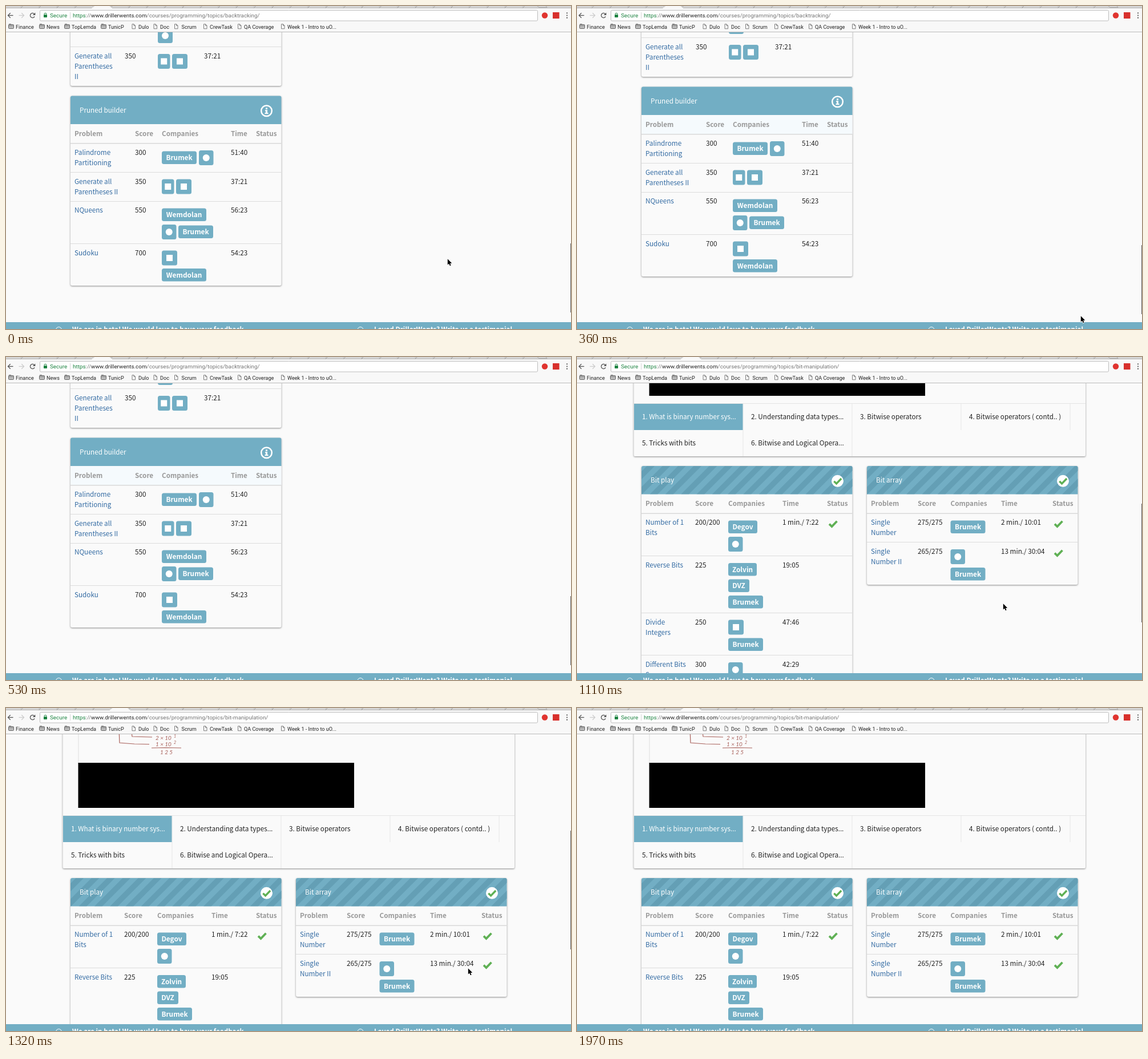
These frames come from a looping animation (990 by 566 pixels, 2.22 s). An HTML page with a canvas:

```html
<!DOCTYPE html>
<html lang="en">
<head>
<meta charset="utf-8">
<title>Course topics</title>
<style>
html, body { margin: 0; width: 100%; height: 100%; overflow: hidden; background: #fafafa; }
canvas { display: block; width: 990px; height: 566px; }
</style>
</head>
<body>
<canvas id="stage" width="990" height="566"></canvas>
<script>
const ctx = document.getElementById('stage').getContext('2d');
const LOOP = 2220;
const BODY = '"Noto Sans CJK JP", "Noto Sans CJK SC", "Noto Sans CJK", "Noto Sans", sans-serif';
const UI = 'Roboto, Inter, sans-serif';
const TEAL = '#72aec4', STRIPE = '#649fb5', LINK = '#336ba3', INK = '#222', PAPER = '#fafafa', GREEN = '#5fb054';
const plain = `11.7px ${BODY}`, bold = `bold 11.7px ${BODY}`, tagFont = `600 11.85px ${BODY}`;

function rect(x, y, w, h, fill) {
  ctx.fillStyle = fill;
  ctx.fillRect(x, y, w, h);
}

function round(x, y, w, h, r, fill, stroke) {
  ctx.beginPath();
  ctx.roundRect(x, y, w, h, r);
  if (fill) { ctx.fillStyle = fill; ctx.fill(); }
  if (stroke) { ctx.strokeStyle = stroke; ctx.lineWidth = 1; ctx.stroke(); }
}

function disc(x, y, r, fill) {
  ctx.beginPath();
  ctx.arc(x, y, r, 0, 7);
  ctx.fillStyle = fill;
  ctx.fill();
}

function ring(x, y, r, color, width) {
  ctx.beginPath();
  ctx.arc(x, y, r, 0, 7);
  ctx.strokeStyle = color;
  ctx.lineWidth = width;
  ctx.stroke();
}

function path(points, color, width) {
  ctx.beginPath();
  for (let i = 0; i < points.length; i += 2) ctx.lineTo(points[i], points[i + 1]);
  ctx.strokeStyle = color;
  ctx.lineWidth = width;
  ctx.stroke();
}

// y is the middle of the capitals
function text(str, x, y, color = INK, font = plain) {
  ctx.font = font;
  ctx.fillStyle = color;
  ctx.fillText(str, x, y + 4.3);
  return x + ctx.measureText(str).width;
}

function check(x, y, size, width) {
  path([x - 6.5 * size, y, x - 2 * size, y + 4.3 * size, x + 7 * size, y - 5 * size], GREEN, width);
}

function panel(x, y, w, h, r) {
  ctx.save();
  ctx.shadowColor = 'rgba(0,0,0,.45)';
  ctx.shadowBlur = 3;
  ctx.shadowOffsetY = 1;
  round(x, y, w, h, r, PAPER);
  ctx.restore();
}

// Company badges: a word, or a plain dot / square for an icon
function badge(x, y, w, label) {
  const icon = label === 'dot' || label === 'box';
  round(x, y, w, icon ? 26 : 22.5, 3.5, TEAL);
  if (label === 'dot') disc(x + w / 2, y + 13, 6, '#fff');
  else if (label === 'box') rect(x + w / 2 - 5.5, y + 7.5, 11, 11, '#fff');
  else {
    ctx.textAlign = 'center';
    text(label, x + w / 2, y + 11.6, '#fff', tagFont);
    ctx.textAlign = 'left';
  }
}

function stripes(x, y, w, h) {
  const step = 27.3;
  ctx.fillStyle = STRIPE;
  for (let right = x + w - step / 2; right > x - h; right -= step) {
    ctx.beginPath();
    ctx.moveTo(right, y + h);
    ctx.lineTo(right - step / 2, y + h);
    ctx.lineTo(right - step / 2 + h, y);
    ctx.lineTo(right + h, y);
    ctx.fill();
  }
}

function drawCard(card) {
  const { x, top, bottom, cols } = card, w = 369.5;
  panel(x, top, w, bottom - top, 3);
  if (card.title) {
    ctx.save();
    round(x, top, w, 49.5, [3, 3, 0, 0], TEAL);
    ctx.clip();
    if (card.solved) stripes(x, top, w, 49.5);
    ctx.restore();
    text(card.title, x + 16, top + 25, '#fff');
    const cx = x + 343.5, cy = top + 26.3;
    if (card.solved) {
      disc(cx, cy, 10.5, '#fff');
      check(cx, cy + 0.5, 0.95, 3.4);
    } else {
      ring(cx, cy, 9.3, '#fff', 2.5);
      rect(cx - 1.5, cy - 5.5, 3, 2.6, '#fff');
      rect(cx - 2.5, cy - 1.5, 4, 1.8, '#fff');
      rect(cx - 1.5, cy - 1.5, 3, 6, '#fff');
      rect(cx - 3, cy + 3.3, 6, 2, '#fff');
    }
    if (card.tint) rect(x, top + 50, w, 33, card.tint);
    ['Problem', 'Score', 'Companies', 'Time', 'Status'].forEach((name, i) =>
      text(name, cols[i], top + 66, '#999', bold));
    rect(x, top + 82.5, w, 1.5, '#d9d9d9');
  }
  for (const y of card.lines) rect(x, y, w, 1, '#dcdcdc');
  for (const [y, name, score, time, done] of card.rows) {
    name.split('|').forEach((part, i) => text(part, cols[0], y + 18 * i, LINK));
    text(score, cols[1], y);
    text(time, cols[3], y);
    if (done) check(cols[4] + 10.5, y + 2.7, 1, 3.8);
  }
  for (const b of card.badges) badge(...b);
}

const upperCard = {
  x: 113, top: -60, bottom: 140, cols: [120, 208, 266, 347, 438], lines: [71],
  rows: [[88, 'Generate all|Parentheses|II', '350', '37:21']],
  badges: [[266, 39, 26, 'dot'], [266, 84, 21.5, 'box'], [291, 84, 27, 'box']]
};
const prunedCard = {
  x: 113, top: 157.5, bottom: 490, title: 'Pruned builder',
  cols: [120, 226, 273, 394, 438], lines: [291, 342, 416],
  rows: [
    [257, 'Palindrome|Partitioning', '300', '51:40'],
    [308, 'Generate all|Parentheses II', '350', '37:21'],
    [358, 'NQueens', '550', '56:23'],
    [433, 'Sudoku', '700', '54:23']
  ],
  badges: [
    [273, 254.5, 61, 'Brumek'], [338, 253, 25.5, 'dot'],
    [273, 303.5, 21.5, 'box'], [298, 303.5, 27, 'box'],
    [273, 354.5, 78, 'Wemdolan'], [273, 383, 25.5, 'dot'], [302, 384.5, 61, 'Brumek'],
    [273, 428.5, 27, 'box'], [273, 460, 78, 'Wemdolan']
  ]
};
const playCard = {
  x: 113, top: 191, bottom: 591, title: 'Bit play', solved: true,
  cols: [120, 207, 265, 360, 438], lines: [348, 448, 522],
  rows: [
    [290, 'Number of 1|Bits', '200/200', '1 min./ 7:22', true],
    [365, 'Reverse Bits', '225', '19:05'],
    [465, 'Divide|Integers', '250', '47:46'],
    [539, 'Different Bits|Sum|Pairwise', '300', '42:29']
  ],
  badges: [
    [265, 286.5, 51, 'Degov'], [265, 315, 25.5, 'dot'],
    [265, 361, 50, 'Zolvin'], [265, 389.5, 37, 'DVZ'], [265, 418, 61, 'Brumek'],
    [265, 460.5, 27, 'box'], [265, 492.5, 61, 'Brumek'], [265, 535, 25.5, 'dot']
  ]
};
const arrayCard = {
  x: 508, top: 191, bottom: 399, title: 'Bit array', solved: true,
  cols: [515, 597, 654.5, 743, 833], lines: [324],
  rows: [
    [290, 'Single|Number', '275/275', '2 min./ 10:01', true],
    [341, 'Single|Number II', '265/275', '13 min./ 30:04', true]
  ],
  badges: [[654.5, 286.5, 61, 'Brumek'], [654.5, 337, 25.5, 'dot'], [654.5, 369, 61, 'Brumek']]
};

function backtrackingPage(scroll) {
  prunedCard.tint = scroll ? '#f5fafd' : null;
  drawCard(upperCard);
  drawCard(prunedCard);
}

function handwriting() {
  const red = '#a8605a', pen = `italic 10px Lato, sans-serif`;
  path([198, -70, 199, -46, 225, -44, 251, -43.5], red, 1.2);
  path([220, -65, 221, -57, 256, -56], red, 1.2);
  text('2 × 10', 262, -55, red, pen);
  text('1 × 10', 262, -44, red, pen);
  text('1', 294, -59, red, `italic 7px Lato, sans-serif`);
  text('2', 294, -48, red, `italic 7px Lato, sans-serif`);
  path([255, -37, 280, -37.5, 307, -37], red, 1.1);
  text('1 2 5', 270, -30, red, pen);
}

function lessonPanel() {
  panel(99.5, -300, 791.5, 474, 2);
  rect(126.5, -200, 1, 190, '#ddd');
  handwriting();
  rect(126.5, -11, 483.5, 79, '#000');
  rect(100, 81, 791, 1, '#e4e4e4');
  for (let i = 1; i < 5; i++) rect(99.5 + 191 * i, 82, 1, i < 3 ? 92 : 46, '#e6e6e6');
  rect(100, 82, 190.5, 46, TEAL);
  ['1. What is binary number sys...', '2. Understanding data types...', '3. Bitwise operators',
    '4. Bitwise operators ( contd.. )', '5. Tricks with bits', '6. Bitwise and Logical Opera...'
  ].forEach((name, i) => text(name, 114 + 191 * (i % 4), i < 4 ? 104.5 : 150.5, i ? INK : '#fff'));
}

function bitsPage() {
  lessonPanel();
  drawCard(playCard);
  drawCard(arrayCard);
  rect(0, 695.5, 990, 60, '#eeeeee');
  [[297, 'About Us'], [385, 'FAQ'], [445, 'Contact Us'], [542, 'Terms'], [614, 'Privacy Policy']]
    .forEach(([x, name]) => text(name, x, 721.5, LINK));
  for (const x of [364, 424, 521, 593]) rect(x, 712, 1, 18, '#444');
}

function feedbackBar() {
  rect(0, 554, 990, 12, TEAL);
  ring(92.5, 567.5, 5, '#fff', 1);
  ring(621, 567.5, 5, '#fff', 1);
  text('We are in beta! We would love to have your feedback.', 116, 567, '#fff', bold);
  text('Loved DrillerWents? Write us a testimonial.', 645, 567, '#fff', bold);
}

function tabStrip(active) {
  rect(0, 0, 990, 4, '#d6d6d6');
  rect(0, 3, 990, 1, '#b4b4b4');
  const step = 31.4;
  for (let i = 0; i < 30; i++) {
    const x = -6 + step * i;
    path([x, 4, x + 4, 0], '#a2a2a2', 1);
    path([x + 4, 4, x, 0], '#c0c0c0', 1);
  }
  const x = -4 + step * active;
  ctx.beginPath();
  ctx.moveTo(x - 3, 4);
  ctx.lineTo(x + 2, 0);
  ctx.lineTo(x + step - 3, 0);
  ctx.lineTo(x + step + 2, 4);
  ctx.fillStyle = '#f8f8f8';
  ctx.fill();
  path([931, 0, 934, 2.5, 948, 2.5, 946, 0], '#aaa', 1);
}

function toolbarIcons() {
  const arrow = (x, dir, color) => {
    path([x - 4.5, 16.5, x + 4.5, 16.5], color, 1.3);
    path([x - dir * 0.3, 12.2, x - dir * 4.5, 16.5, x - dir * 0.3, 20.8], color, 1.3);
  };
  arrow(8, 1, '#555');
  arrow(27, -1, '#ccc');
  ctx.beginPath();
  ctx.arc(46.5, 16.5, 4, 0.5, 5.5);
  ctx.strokeStyle = '#555';
  ctx.lineWidth = 1.4;
  ctx.stroke();
  ctx.beginPath();
  ctx.moveTo(51.3, 11.5);
  ctx.lineTo(51.3, 16);
  ctx.lineTo(46.8, 16);
  ctx.fillStyle = '#555';
  ctx.fill();

  ring(902, 15.5, 3.3, '#555', 1.2);
  path([904.3, 18, 907.5, 21], '#555', 1.5);
  path([900.3, 15.5, 903.7, 15.5], '#555', 1);
  path([902, 13.8, 902, 17.2], '#555', 1);

  ctx.beginPath();
  for (let i = 0; i < 10; i++) {
    const a = -Math.PI / 2 + i * Math.PI / 5, r = i % 2 ? 2.1 : 4.8;
    ctx.lineTo(921.3 + r * Math.cos(a), 16.8 + r * Math.sin(a));
  }
  ctx.closePath();
  ctx.strokeStyle = '#555';
  ctx.lineWidth = 0.9;
  ctx.stroke();
  disc(944, 16.5, 5.2, '#e0342f');
  rect(958, 11, 11.5, 11, '#d8302c');
  for (const y of [12.3, 16.5, 20.7]) disc(983, y, 1.1, '#555');
}

function addressBar(path_) {
  round(59.5, 7.5, 872, 18.5, 2, '#fff', '#bdbdbd');
  const green = '#1d8341', font = `9.9px ${UI}`;
  round(66, 15, 6, 5, 0.8, green);
  ctx.beginPath();
  ctx.arc(69, 14.5, 2, Math.PI, 0);
  ctx.strokeStyle = green;
  ctx.lineWidth = 1.1;
  ctx.stroke();
  text('Secure', 77, 16, green, font);
  rect(112, 11, 1, 11, '#d5d5d5');
  let x = text('https', 117, 16, green, font);
  x = text('://', x, 16, '#777', font);
  x = text('www.drillerwents.com', x, 16, INK, font);
  text(path_, x, 16, '#757575', font);
}

function bookmarks() {
  const font = `9.1px ${UI}`;
  [[4, 'Finance'], [58, 'News'], [102, 'TopLemda'], [166, 'TunicP']].forEach(([x, name]) => {
    round(x + 0.5, 32.5, 9, 7, 1, '#bbb', '#666');
    rect(x + 1, 31.3, 4, 1.5, '#666');
    rect(x + 1, 34, 8, 0.8, '#777');
    text(name, x + 13, 35.2, INK, font);
  });
  [[220, 'Dulo', 12], [258, 'Doc', 12], [294.5, 'Scrum', 13], [345.5, 'CrewTask', 11.5],
    [405.5, 'QA Coverage', 11.5], [481.5, 'Week 1 - Intro to uO...', 11.5]].forEach(([x, name, gap]) => {
    path([x + 4, 31.8, x + 1, 31.8, x + 1, 39.8, x + 6.5, 39.8, x + 6.5, 34.3, x + 4, 31.8, x + 4, 34.3, x + 6.5, 34.3], '#707070', 0.9);
    text(name, x + gap, 35.2, INK, font);
  });
}

function browser(active, route) {
  rect(0, 0, 990, 46, '#f8f8f8');
  tabStrip(active);
  toolbarIcons();
  addressBar('/courses/programming/topics/' + route + '/');
  bookmarks();
  rect(0, 45, 990, 1, '#bcbcbc');
}

function pointer(x, y) {
  ctx.beginPath();
  [[0, 0], [0, 10.3], [2.4, 8.2], [4, 12], [5.8, 11.2], [4.2, 7.6], [7.4, 7.4]]
    .forEach(([dx, dy]) => ctx.lineTo(x + 0.8 + dx, y + 0.3 + dy));
  ctx.closePath();
  ctx.lineJoin = 'round';
  ctx.strokeStyle = '#fff';
  ctx.lineWidth = 1.6;
  ctx.stroke();
  ctx.fillStyle = '#000';
  ctx.fill();
  ctx.lineJoin = 'miter';
}

const pages = {
  back: { draw: backtrackingPage, tab: 5, route: 'backtracking', thumb: 121 },
  bits: { draw: bitsPage, tab: 6, route: 'bit-manipulation', thumb: 208 }
};
// Each step holds until the next one begins
const steps = [
  { at: 0, page: 'back', scroll: 0, mouse: [773, 443], bar: 416 },
  { at: 150, page: 'back', scroll: -16, mouse: [847, 503], bar: 419 },
  { at: 360, page: 'back', scroll: -16, mouse: [882, 543], bar: 419 },
  { at: 530, page: 'back', scroll: -16, bar: 419 },
  { at: 960, page: 'bits', scroll: -180, mouse: [746, 432], bar: 327 },
  { at: 1110, page: 'bits', scroll: 0, mouse: [746, 432], bar: 257 },
  { at: 1320, page: 'bits', scroll: 107, mouse: [809, 456], bar: 215 },
  { at: 1500, page: 'bits', scroll: 107, mouse: [909, 531], bar: 215 },
  { at: 1670, page: 'bits', scroll: 107, mouse: [937, 545], bar: 215 },
  { at: 1820, page: 'bits', scroll: 107, bar: 215, fade: 0.4 },
  { at: 1970, page: 'bits', scroll: 107, fade: 0 }
];

function render(time) {
  const step = steps.findLast(s => s.at <= time), page = pages[step.page];
  rect(0, 0, 990, 566, PAPER);
  ctx.save();
  ctx.translate(0, step.scroll);
  page.draw(step.scroll);
  ctx.restore();
  feedbackBar();
  browser(page.tab, page.route);
  const fade = step.fade ?? 1;
  if (fade) rect(989, step.bar, 1, page.thumb, `rgba(95,95,95,${fade})`);
  if (step.mouse) pointer(...step.mouse);
}

const start = performance.now();
function tick() {
  render((performance.now() - start) % LOOP);
  requestAnimationFrame(tick);
}
tick();
</script>
</body>
</html>
```
